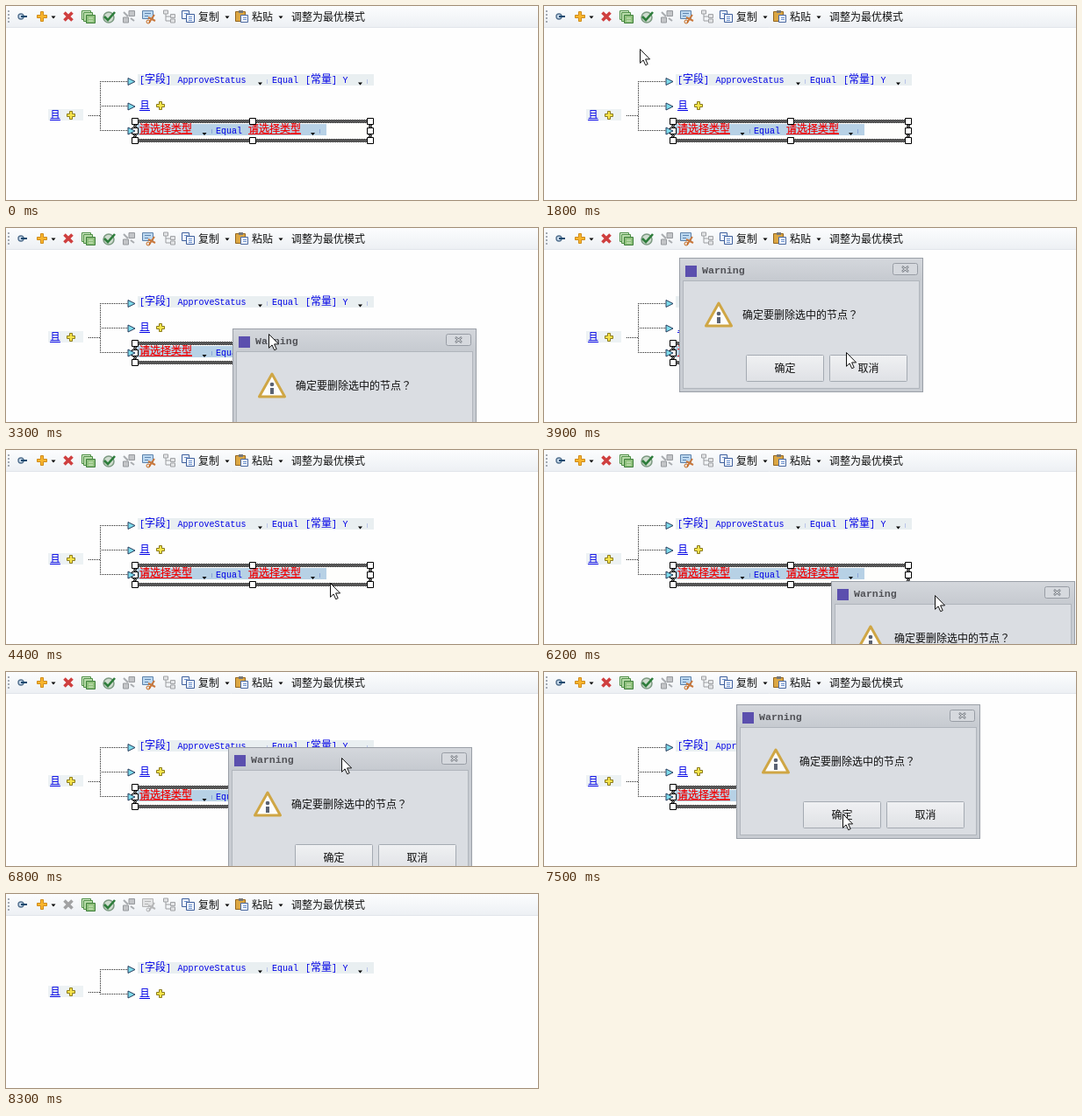
Animation, 606 px wide and 222 px high, one loop 8700 ms. Source, as an HTML page:

```html
<!DOCTYPE html>
<html lang="zh-CN">
<head>
<meta charset="utf-8">
<title>Condition tree</title>
<style>
  html, body { margin: 0; width: 100%; height: 100%; overflow: hidden; background: #fefefe; }
  svg { display: block; }
  text { font: 12px "Noto Sans CJK SC", "Noto Sans CJK", sans-serif; fill: #111; white-space: pre; }
  .code { font: 10px "Liberation Mono", "DejaVu Sans Mono", monospace; fill: #0000e6; }
  .link { fill: #0000e6; }
  .todo { fill: #f00000; stroke: #f00000; stroke-width: .25; }
  .title { font: bold 11.6px "Liberation Mono", "DejaVu Sans Mono", monospace; fill: #505156; }
  .centred-mark { font-family: "Noto Sans CJK TC", "Noto Sans CJK", sans-serif; }
  .dim { filter: grayscale(1); opacity: .55; }
  .muted { fill: #969696; }
  .middle { text-anchor: middle; }
</style>
</head>
<body>
<svg id="stage" width="606" height="222" viewBox="0 0 606 222">
  <defs>
    <linearGradient id="barFill" x2="0" y2="1">
      <stop stop-color="#fcfdfe"/><stop offset="1" stop-color="#edf0f4"/>
    </linearGradient>
    <linearGradient id="titleFill" x2="0" y2="1">
      <stop stop-color="#d4d7dc"/><stop offset="1" stop-color="#c6cad0"/>
    </linearGradient>
    <linearGradient id="buttonFill" x2="0" y2="1">
      <stop stop-color="#f0f1f3"/><stop offset="1" stop-color="#dfe1e5"/>
    </linearGradient>
    <pattern id="hatch" width="2" height="2" patternUnits="userSpaceOnUse">
      <path d="M0 0h2v2h-2z" fill="#aaa"/><path d="M0 0h1v1h-1zM1 1h1v1h-1z" fill="#000"/>
    </pattern>
    <path id="caret" d="M-2.5-1.5h5L0 1.5z"/>
    <path id="plus" d="M-1.5-4.5h3v3h3v3h-3v3h-3v-3h-3v-3h3z" fill="#f7e44c" stroke="#8b7a1c"/>
    <path id="branch" d="M-4-4L4 0L-4 4z" fill="#7fdcec" stroke="#263c5c"/>
    <path id="handle" d="M-3.5-3.5h7v7h-7z" fill="#fff" stroke="#000"/>
    <g id="pages">
      <path d="M-7.5-6.5h8v9h-8z" fill="#f3f7ff" stroke="#3e5f9c"/>
      <path d="M-2.5-2.5h9v9h-9z" fill="#f3f7ff" stroke="#3e5f9c"/>
      <path d="M-5-3.5h4M0 .5h4M0 2.5h4M0 4.5h4" stroke="#6c91cc"/>
    </g>
  </defs>
  <rect width="606" height="222" fill="#fefefe"/>
  <g id="toolbar"></g>
  <g id="tree"></g>
  <g id="menu"></g>
  <g id="dialog"></g>
  <path id="cursor" d="M.5.5v15.8l3.6-3.4 2.6 5.8 2.5-1.1-2.6-5.7h5z" fill="#fff" stroke="#111"/>
</svg>
<script>
const LOOP = 8700, STEP = 100;
const $ = id => document.getElementById(id);
const label = (x, y, str, cls = '') => `<text x="${x}" y="${y}" class="${cls}">${str}</text>`;
const use = (id, x, y) => `<use href="#${id}" x="${x}" y="${y}"/>`;
const rect = (x, y, w, h, fill, more = '') =>
  `<rect x="${x}" y="${y}" width="${w}" height="${h}" fill="${fill}" ${more}/>`;
const icon = (x, body, id = '') => `<g id="${id}" transform="translate(${x} 12)">${body}</g>`;

$('toolbar').innerHTML = [
  rect(0, 0, 606, 24, 'url(#barFill)'),
  '<path d="M0 24.5h606" stroke="#e1e5ea"/>',
  '<path d="M3 5v14" stroke="#a3a9b2" stroke-width="2" stroke-dasharray="2 2"/>',
  rect(60.5, 1.5, 21, 21, '#e9f1fb', 'id="hover" stroke="#a9c3e2" rx="2"'),
  icon(19, `<circle cx="-2" r="3" fill="#c9dcee" stroke="#54718f" stroke-width="1.4"/>
    <path d="M-2 0h7" stroke="#1c4a70" stroke-width="2"/>`),
  icon(41, '<path d="M-1.5-5.5h3v4h4v3h-4v4h-3v-4h-4v-3h4z" fill="#f8b52c" stroke="#d08a1a"/>'),
  use('caret', 54, 13),
  icon(71, '<path d="M-4.5-4.5L4.5 4.5M4.5-4.5L-4.5 4.5" stroke="#cf3f3f" stroke-width="3.6"/>', 'remove'),
  icon(94, `<path d="M-7.5-6.5h10v10h-10z" fill="#d9efcf" stroke="#4c8e43"/>
    <path d="M-5.5-4.5h10v10h-10z" fill="#b9dcaa" stroke="#4c8e43"/>
    <path d="M-2.5-1.5h10v9h-10z" fill="#8fc07c" stroke="#3d7f39"/>
    <path d="M0 2h5M0 5h5" stroke="#d5ecc9"/>`),
  icon(117, `<circle cy="1" r="6" fill="#cfdccf" stroke="#7d9a82" stroke-width="1.5"/>
    <path d="M-5 0l4 4 8-9" fill="none" stroke="#2e7d3b" stroke-width="2.6"/>`),
  icon(140, `<path d="M0-6.5h6.5v6h-6.5zM-6.5 1h6v6h-6z" fill="#c3c5c8" stroke="#96999d"/>
    <path d="M-6-5l5 5M6 5l-4-3" stroke="#a9acb0" stroke-width="2"/>`),
  icon(163, `<path d="M-7.5-6.5h12v9h-12z" fill="#bcd8f0" stroke="#5d82ab"/>
    <path d="M-5-3.5h7M-5-.5h4" stroke="#5f86b0"/>
    <path d="M0 7l6-9M7 5l-8-4" stroke="#c9783c" stroke-width="2"/>
    <circle cx="-1" cy="6" r="2" fill="none" stroke="#c4691e"/>`, 'cut'),
  icon(186, `<path d="M-4-4v9h5M-4 0h5" fill="none" stroke="#9b9da0"/>
    <path d="M-6.5-7h5v4h-5zM1.5-2.5h5v4h-5zM1.5 3h5v4h-5z" fill="#e3e4e6" stroke="#a0a2a5"/>`),
  use('pages', 208, 12), label(219, 16.5, '复制'), use('caret', 252, 13),
  icon(269, `<path d="M-7.5-5.5h11v11h-11z" fill="#dca743" stroke="#93651f"/>
    <path d="M-4-7h5v3h-5z" fill="#777"/>
    <path d="M-1.5-1.5h8v8h-8z" fill="#f3f7ff" stroke="#4b69a0"/><path d="M1 1.5h4M1 3.5h4" stroke="#6c91cc"/>`),
  label(280, 16.5, '粘贴'), use('caret', 313, 13), label(325, 16.5, '调整为最优模式')
].join('');

// Blue bracketed tag: half-width brackets around two full-width characters.
const tag = (x, y, word) => label(x, y, '[', 'code') + label(x + 6, y, word, 'link') + label(x + 30, y, ']', 'code');
const underlined = (x, y, str, color, cls) =>
  label(x, y, str, cls) + rect(x, y + 1, str.length * 12, 1, color);
const andNode = (x, y, plusX) =>
  underlined(x, y + 4, '且', '#0000e6', 'link') + use('plus', plusX, y);

const handles = [147, 281, 415].flatMap(x => [132, 143, 154].map(y => [x, y]))
  .filter(([x, y]) => x !== 281 || y !== 143);

$('tree').innerHTML = `
  <g id="root">${rect(48, 118, 40, 13, '#edf2f4')}${andNode(50, 125, 74)}</g>
  <path id="wires" fill="none" stroke="#222" stroke-dasharray="1 1"/>
  ${rect(150, 78, 269, 13, '#e9eff1')}
  ${tag(152, 88, '字段')}${label(195.5, 88, 'ApproveStatus', 'code')}
  ${label(303, 88, 'Equal', 'code')}${tag(341, 88, '常量')}${label(383.5, 88, 'Y', 'code')}
  ${use('caret', 289.5, 89)}${use('caret', 403.5, 89)}
  ${rect(297, 84, 1, 5, '#b9c4e8')}${rect(411, 84, 1, 5, '#b9c4e8')}
  ${use('branch', 143, 86.5)}${use('branch', 143, 115)}
  ${andNode(152, 114, 176)}
  <g id="selected">
    ${rect(147, 132, 268, 22, '#fefefc', 'stroke="url(#hatch)" stroke-width="4"')}
    ${rect(149, 135, 216, 13, '#b7d1e5')}
    ${underlined(152, 145, '请选择类型', '#f00000', 'todo')}
    ${label(239, 145.5, 'Equal', 'code')}
    ${underlined(276, 145, '请选择类型', '#f00000', 'todo')}
    ${use('caret', 226, 146.5)}${use('caret', 349.5, 146.5)}
    ${rect(234, 141, 1, 5, '#8ba5d8')}${rect(357, 141, 1, 5, '#8ba5d8')}
    ${handles.map(([x, y]) => use('handle', x, y)).join('')}
    ${use('branch', 143, 143)}
  </g>`;

$('menu').innerHTML = `
  ${rect(381, 145, 136, 90, '#000', 'opacity=".18"')}
  ${rect(378.5, 142.5, 135, 90, '#f3f3f3', 'stroke="#9a9a9a"')}
  <path d="M405.5 144v80" stroke="#dedede"/>
  ${rect(380.5, 144.5, 132, 20, '#c4def5', 'id="pick" stroke="#3d8bd0"')}
  ${label(414, 159, '添加项')}<path d="M499 150v8l4.5-4z"/>
  ${label(414, 181, '删除选中项')}
  ${label(414, 202.5, '添加分组', 'muted')}
  ${label(414, 224, '取消分组')}`;

const button = (x, str) =>
  rect(x + .5, 111.5, 88, 30, 'url(#buttonFill)', 'stroke="#a4aab2" rx="1"') + label(x + 44.5, 131, str, 'middle');

$('dialog').innerHTML = `
  ${rect(.5, .5, 277, 153, '#c8ccd2', 'stroke="#9a9fa7"')}
  ${rect(1, 1, 276, 25, 'url(#titleFill)')}
  ${rect(4.5, 26.5, 269, 123, '#dadde2', 'stroke="#b0b5bc"')}
  ${rect(7, 9, 13, 13, '#5b4fae')}
  ${label(26, 18, 'Warning', 'title')}
  ${rect(243.5, 6.5, 28, 13, '#d6d9de', 'stroke="#989da5" rx="2"')}
  <path d="M254 10l7 6M261 10l-7 6" stroke="#747981" stroke-width="2.4"/>
  <path d="M254.5 10.5l6 5M260.5 10.5l-6 5" stroke="#eef0f2"/>
  <path d="M45 52L59.5 78h-29z" fill="#fdfdfb" stroke="#cfa645" stroke-width="3" stroke-linejoin="round"/>
  <circle cx="45" cy="64" r="2.3" fill="#5a6272"/>
  <path d="M43 68h4v7h-4z" fill="#5a6272"/>
  ${label(72, 70, '确定要删除选中的节点<tspan class="centred-mark" lang="zh-TW">？</tspan>')}
  ${button(76, '确定')}${button(171, '取消')}`;

// Pointer path: time, x, y of the tip.
const pointerPath = [
  [100, 552, 44], [500, 300, 78], [900, 70, 13], [1100, 70, 13],
  [1500, 262, 98], [1800, 109, 49], [2000, 71, 14], [2300, 71, 14],
  [2800, 368, 156], [2900, 368, 156], [3300, 299, 121], [3600, 195, 40],
  [3900, 344, 142], [4100, 366, 157], [4300, 366, 157], [4700, 378, 135],
  [4800, 367, 131], [4900, 367, 131], [5000, 378, 142], [5100, 378, 142],
  [5400, 421, 166], [5700, 424, 173], [6000, 424, 173], [6300, 456, 162],
  [6400, 456, 162], [6800, 382, 98], [7000, 348, 49], [7300, 340, 162],
  [7500, 340, 162], [8000, 538, 130], [8200, 585, 60]
];
const dialogs = [
  { open: 2400, grab: 2900, drop: 3600, close: 4300, dx: 41, dy: 6 },
  { open: 6100, grab: 6400, drop: 7000, close: 7600, dx: 129, dy: 12 }
];

function pointerAt(t) {
  const i = pointerPath.findIndex(p => p[0] > t);
  if (i < 1) return pointerPath.at(i).slice(1);
  const [t0, x0, y0] = pointerPath[i - 1], [t1, x1, y1] = pointerPath[i];
  const k = (t - t0) / (t1 - t0);
  return [Math.round(x0 + (x1 - x0) * k), Math.round(y0 + (y1 - y0) * k)];
}

const show = (id, on) => $(id).setAttribute('visibility', on ? 'visible' : 'hidden');
const move = (id, x, y) => $(id).setAttribute('transform', `translate(${x} ${y})`);
const within = (t, from, to) => t >= from && t < to;

function render(t) {
  const [x, y] = pointerAt(t);
  move('cursor', x, y);
  show('cursor', within(t, 100, 8300));

  const deleted = t >= 7600;
  show('selected', !deleted);
  move('root', 0, deleted ? -13 : 0);
  $('wires').setAttribute('d', deleted
    ? 'M94 112.5h13M107.5 86v29M107 86.5h32M107 114.5h32'
    : 'M94 125.5h13M107.5 86v57M107 86.5h32M107 114.5h32M107 142.5h32');
  for (const id of ['remove', 'cut']) $(id).classList.toggle('dim', deleted);
  show('hover', within(t, 100, 2400) && within(x, 60, 82) && y < 23);

  show('menu', within(t, 5000, 6000));
  $('pick').setAttribute('y', t < 5500 ? 144.5 : 166.5);
  show('pick', within(t, 5200, 6000));

  const box = dialogs.find(d => within(t, d.open, d.close));
  show('dialog', box);
  if (box) {
    const [px, py] = pointerAt(Math.min(Math.max(t, box.grab), box.drop));
    move('dialog', px - box.dx, py - box.dy);
  }
}

const start = performance.now();
function tick() {
  const t = (performance.now() - start) % LOOP;
  render(Math.floor(t / STEP) * STEP);
  requestAnimationFrame(tick);
}
tick();
</script>
</body>
</html>
```
